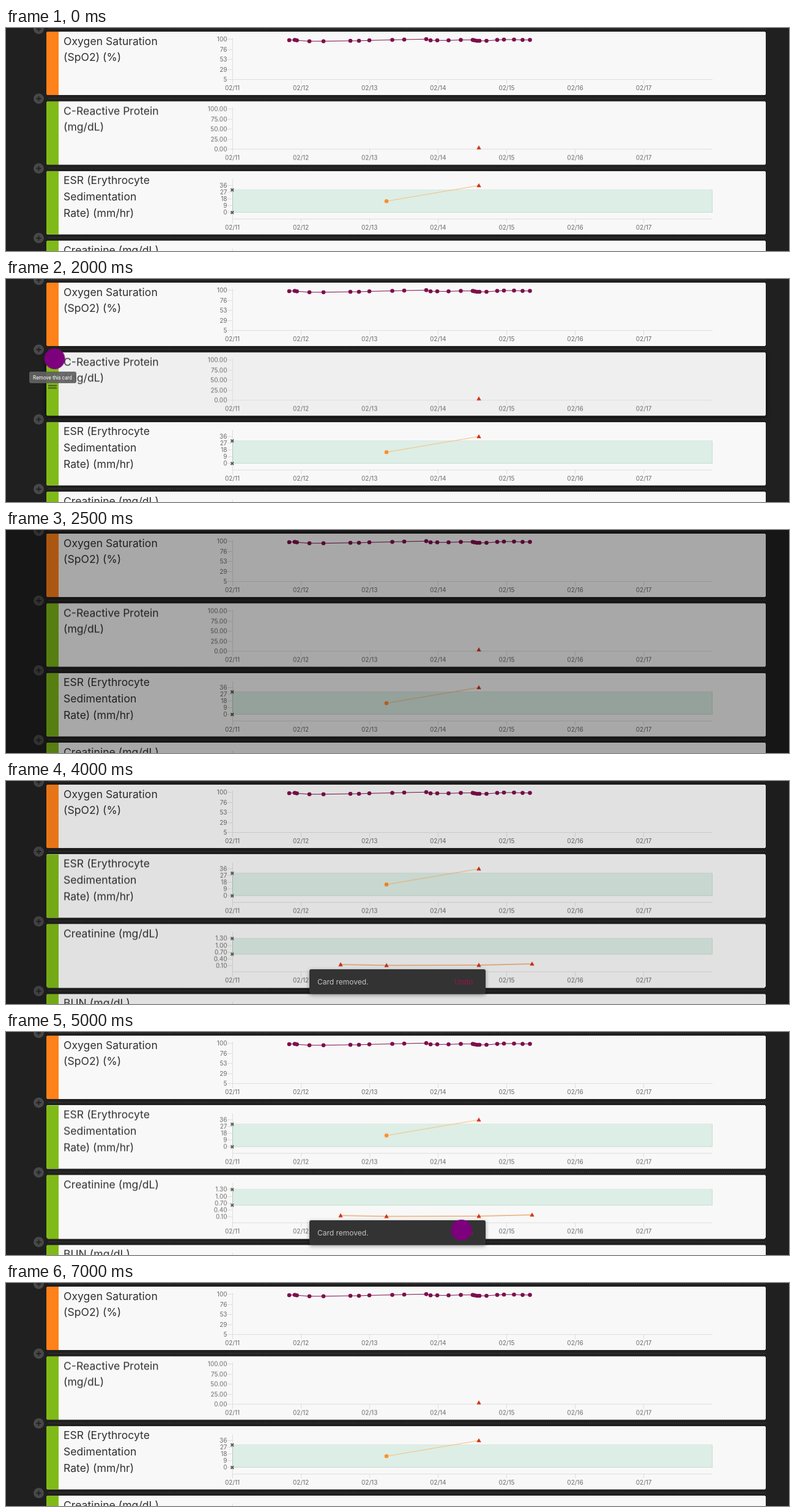
An HTML page that plays this animation: 1280 px wide and 366 px high, repeating every 8000 ms.

```html
<!DOCTYPE html>
<html lang="en">
<head>
<meta charset="utf-8">
<title>Lab cards</title>
<style>
html, body { margin: 0; width: 100%; height: 100%; overflow: hidden; background: #202020; }
svg { display: block; width: 1280px; height: 366px; }
text { font-family: Inter, sans-serif; }
.title { font-size: 17.6px; fill: #303030; }
.axis text { font-size: 10px; fill: #6a6a6a; }
.axis path { stroke: #dedede; fill: none; }
.axis path, .band, .base, .hover, .bar { shape-rendering: crispEdges; }
.band { fill: rgba(68, 181, 128, .15); stroke: rgba(60, 120, 95, .15); }
.cross { stroke: #555; stroke-width: 1.8; }
.base { fill: #f8f8f8; }
.hover { fill: #efefef; filter: drop-shadow(0 2px 5px rgba(0, 0, 0, .7)); }
.icons { stroke: #333; stroke-width: 1.6; fill: none; }
.gap line { stroke: #505050; stroke-dasharray: 1.3 1.9; }
.gap circle { fill: #484848; }
.gap path { stroke: #202020; stroke-width: 1.8; }
.lit line { stroke: #a0a0a0; }
.lit circle { fill: #9a9a9a; }
.hover, .icons, .lit, #tip, #dim, #snack, #cursor { opacity: 0; }

/* every change is a hard step; one quarter second is 3.125% */
.hover, .icons, .lit, .card, #tip, #dim, #snack, #cursor {
  animation: none 8s step-end infinite;
}
#crp { animation-name: removed; }
#esr, #creatinine, #bun { animation-name: moved; }
#crp .hover, #crp .icons { animation-name: crpHover; }
#esr .hover { animation-name: esrHover; }
#esr .icons { animation-name: esrIcons; }
#lit3 { animation-name: lowGap; }
#lit2 { animation-name: midGap; }
#tip { animation-name: tip; }
#dim { animation-name: dim; }
#snack { animation-name: snack; }
#cursor { animation-name: cursor; }

@keyframes removed { 0%, 71.875% { opacity: 1 } 50% { opacity: 0 } }
@keyframes moved { 0%, 71.875% { transform: none } 50% { transform: translateY(-114.4px) } }
@keyframes crpHover {
  0%, 31.25% { opacity: 0 } 15.625%, 28.125% { opacity: .5 } 18.75% { opacity: 1 }
}
@keyframes esrHover { 0%, 84.375% { opacity: 0 } 71.875% { opacity: 1 } }
@keyframes esrIcons {
  0%, 87.5% { opacity: 0 } 71.875%, 84.375% { opacity: .2 } 75% { opacity: 1 }
}
@keyframes lowGap { 0%, 9.375% { opacity: 0 } 3.125% { opacity: .6 } 6.25% { opacity: 1 } }
@keyframes midGap { 0%, 15.625% { opacity: 0 } 9.375% { opacity: .6 } 12.5% { opacity: 1 } }
@keyframes tip { 0%, 28.125% { opacity: 0 } 18.75% { opacity: 1 } }
@keyframes dim {
  0%, 53.125% { opacity: 0 } 28.125% { opacity: .2 } 31.25% { opacity: .325 } 50% { opacity: .095 }
}
@keyframes snack { 0%, 71.875% { opacity: 0 } 50% { opacity: 1 } }
@keyframes cursor {
  0% { opacity: 0 }
  3.125% { opacity: 1; transform: translate(400px, 350px) }
  6.25% { opacity: 1; transform: translate(320px, 340px) }
  9.375% { opacity: 1; transform: translate(220px, 242px) }
  12.5% { opacity: 1; transform: translate(145px, 226px) }
  15.625% { opacity: 1; transform: translate(88px, 150px) }
  18.75% { opacity: 1; transform: translate(81px, 133px) }
  25%, 28.125% { opacity: 1; transform: translate(79.5px, 131px) }
  31.25% { opacity: 0; transform: translate(79.5px, 131px) }
  56.25% { opacity: 1; transform: translate(690px, 230px) }
  59.375% { opacity: 1; transform: translate(730px, 300px) }
  62.5% { opacity: 1; transform: translate(744.5px, 325px) }
  84.375%, 100% { opacity: 0; transform: translate(744.5px, 325px) }
}
</style>
</head>
<body>
<svg viewBox="0 0 1280 366">
  <g id="gaps"></g>
  <g id="cards"></g>
  <rect id="dim" width="1280" height="366"/>
  <g id="snack">
    <rect x="496" y="309" width="288" height="40" rx="3" fill="#333"
      style="filter: drop-shadow(0 2px 3px rgba(0, 0, 0, .4))"/>
    <text x="509" y="333.5" font-size="12" fill="#c4c4c4">Card removed.</text>
    <text x="733" y="333.5" font-size="12" fill="#961450">Undo</text>
  </g>
  <circle id="cursor" r="17" fill="#7d007d"/>
  <g id="tip">
    <rect x="38" y="152" width="77" height="19" rx="3" fill="#616161" fill-opacity=".93"/>
    <text x="76" y="164.6" text-anchor="middle" fill="#fff"
      style="font: 8.3px Roboto, sans-serif">Remove this card</text>
  </g>
</svg>
<script>
const PITCH = 114.4, HEIGHT = 104.4, LEFT = 370, RIGHT = 1155, BASE = 78.5;
const range = n => [...Array(n).keys()];

// shapes of one data point
const dot = (color, r = 3.3) => ([x, y]) => `<circle cx="${x}" cy="${y}" r="${r}" fill="${color}"/>`;
const tri = ([x, y]) => `<path d="M${x} ${y - 3.8}l3.7 6.6h-7.4z" fill="#cf3314"/>`;
const line = (points, color) => `<polyline points="${points}" fill="none" stroke="${color}"/>`;

const spo2 = [
  [463, 14], [472, 13.5], [475.5, 14.3], [496, 15.7], [519, 15.7], [563, 15], [577, 15],
  [594, 14.3], [631.5, 13.5], [651, 13], [687, 12.3], [694, 14.2], [705, 14.3], [723.5, 14.3],
  [743.5, 13.6], [763, 13.6], [766, 14.3], [770, 15], [774, 15], [785.5, 15], [803, 13.6],
  [814, 13], [830.5, 13], [844.5, 13.6], [856.5, 13.6]
];
const esr = [[622, 49.5], [773, 23.7]];
const creatinine = [[547, 66.4], [622, 67.8], [773, 67.4], [860, 65.3]];

const wide = { top: 10, first: 12.5, step: 16.5 };
const tight = { top: 13, first: 23.7, step: 11.1 };
const GREEN = '#80ba18';

const cards = [
  { id: 'spo2', bar: '#ff8119', title: ['Oxygen Saturation', '(SpO2) (%)'], ...wide,
    labels: [100, 76, 53, 29, 5],
    data: line(spo2, '#7d0f4b') + spo2.map(dot('#7d0f4b')).join('') },
  { id: 'crp', bar: GREEN, title: ['C-Reactive Protein', '(mg/dL)'], ...wide,
    labels: ['100.00', '75.00', '50.00', '25.00', '0.00'],
    data: tri([773, 76]) },
  { id: 'esr', bar: GREEN, title: ['ESR (Erythrocyte', 'Sedimentation', 'Rate) (mm/hr)'], ...tight,
    labels: [36, 27, 18, 9, 0], band: [31, 68],
    data: line(esr, '#f6bd78') + dot('#ff8f2a')(esr[0]) + tri(esr[1]) },
  { id: 'creatinine', bar: GREEN, title: ['Creatinine (mg/dL)'], ...tight,
    labels: ['1.30', '1.00', '0.70', '0.40', '0.10'], band: [23.7, 49.4],
    data: line(creatinine, '#e5822c') + creatinine.map(tri).join('') },
  { id: 'bun', bar: GREEN, title: ['BUN (mg/dL)'], ...tight, labels: [], data: '' }
];

function axis({ top, first, step, labels }) {
  const days = range(7).map(i => {
    const x = LEFT + 112.1 * i;
    return `<path d="M${x} ${BASE}v7"/>
      <text x="${x}" y="96.2" text-anchor="middle">02/${11 + i}</text>`;
  });
  const values = labels.map((label, i) => {
    const y = first + step * i;
    return `<path d="M362 ${y}h8"/>
      <text x="361.5" y="${y + 3.6}" text-anchor="end">${label}</text>`;
  });
  return `<g class="axis"><path d="M${LEFT + .5} ${top}V86M${LEFT} ${BASE}H${RIGHT}"/>
    ${days.join('')}${values.join('')}</g>`;
}

function band([top, bottom]) {
  const cross = y => `<path class="cross" d="M367.5 ${y - 2.3}l4.6 4.6m0 -4.6l-4.6 4.6"/>`;
  return `<rect class="band" x="${LEFT}" y="${top}" width="784.5" height="${bottom - top}"/>
    ${cross(top)}${cross(bottom)}`;
}

function card(c, i) {
  const rect = kind => `<rect class="${kind}" x="66" width="1176" height="${HEIGHT}" rx="3"/>`;
  const title = c.title.map((t, row) =>
    `<text class="title" x="94" y="${21.7 + 26.7 * row}">${t}</text>`);
  return `<g transform="translate(0 ${6 + PITCH * i})"><g class="card" id="${c.id}">
    ${rect('base')}${rect('hover')}
    <path class="bar" d="M86 0v${HEIGHT}h-17a3 3 0 0 1 -3 -3V3a3 3 0 0 1 3 -3z" fill="${c.bar}"/>
    <path class="icons" d="M71 5l10 10m0 -10l-10 10M69 54.5h14m-14 4h14"/>
    ${title.join('')}${axis(c)}${c.band ? band(c.band) : ''}${c.data}
  </g></g>`;
}

function gap(i, lit) {
  return `<g class="gap ${lit ? 'lit' : ''}" ${lit ? `id="lit${i}"` : ''}
    transform="translate(0 ${1.6 + PITCH * i})">
    <line x1="70" x2="1242" y1="-.5" y2="-.5"/>
    <circle cx="53.5" r="8.5"/><path d="M49.5 0h8m-4 -4v8"/></g>`;
}

document.getElementById('gaps').innerHTML =
  range(4).map(i => gap(i)).join('') + gap(2, true) + gap(3, true);
document.getElementById('cards').innerHTML = cards.map(card).join('');
</script>
</body>
</html>
```
